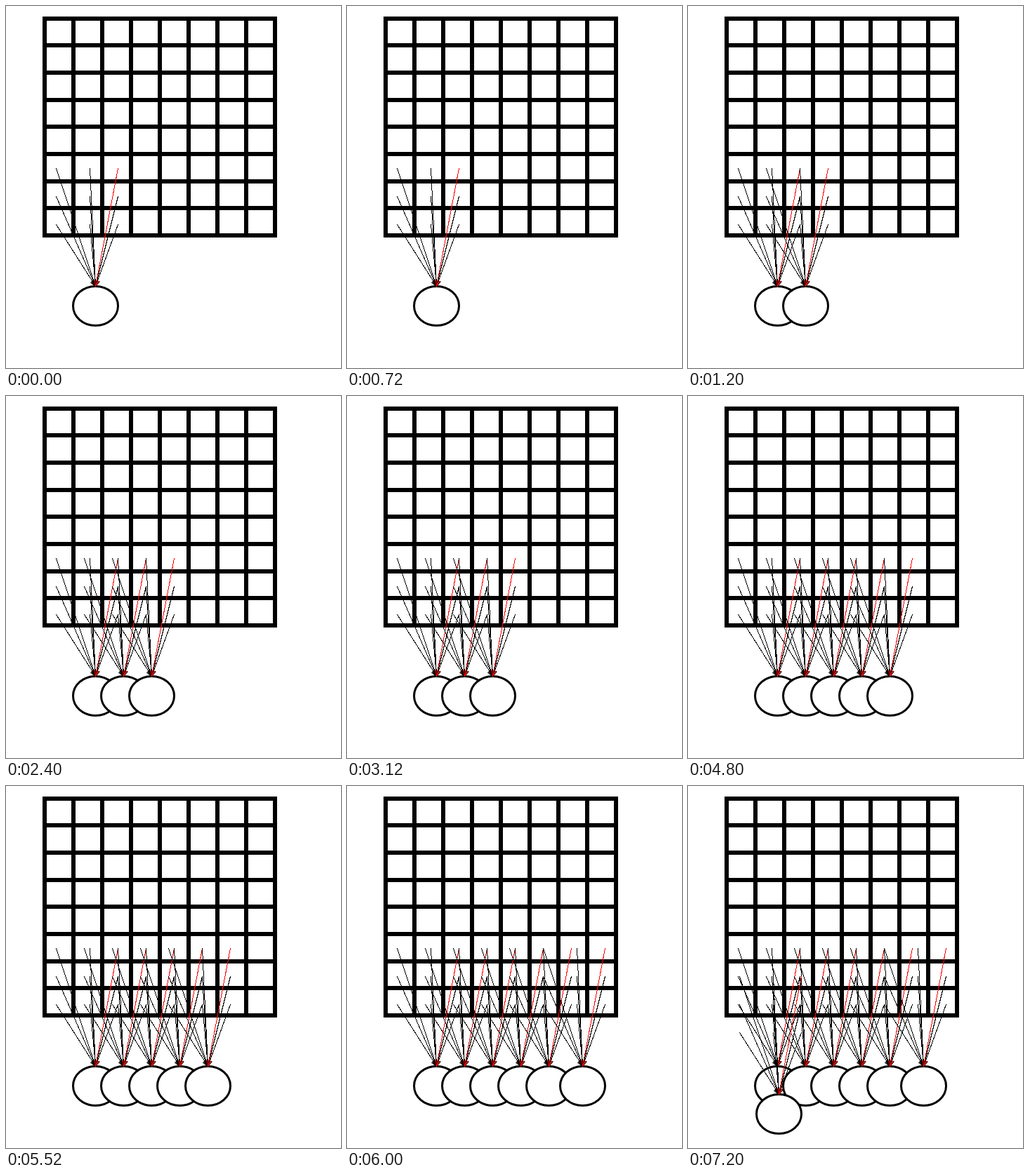
Recreate the animation shown at these times as an HTML page. Size 477 px wide and 516 px high, loop 8000 ms.

```html
<!DOCTYPE html>
<html lang="en">
<head>
<meta charset="utf-8">
<title>Sliding window connections</title>
<style>
  html, body { margin: 0; width: 100%; height: 100%; overflow: hidden; background: #fff; }
  svg { display: block; }
  .grid { stroke: #000; stroke-width: 6; fill: none; shape-rendering: crispEdges; }
  .link, .head { stroke: #000; stroke-width: 1; fill: none; }
  .link { shape-rendering: crispEdges; }
  .red { stroke: #f00; }
  .node { fill: #fff; stroke: #000; stroke-width: 3; }

  /* Each unit pops in 1.2 s after the one before it. */
  .unit { animation: 8s step-end infinite; }
  .u2 { animation-name: show2; }
  .u3 { animation-name: show3; }
  .u4 { animation-name: show4; }
  .u5 { animation-name: show5; }
  .u6 { animation-name: show6; }
  .u7 { animation-name: show7; }
  @keyframes show2 { 0% { visibility: hidden } 15%, 100% { visibility: visible } }
  @keyframes show3 { 0% { visibility: hidden } 30%, 100% { visibility: visible } }
  @keyframes show4 { 0% { visibility: hidden } 45%, 100% { visibility: visible } }
  @keyframes show5 { 0% { visibility: hidden } 60%, 100% { visibility: visible } }
  @keyframes show6 { 0% { visibility: hidden } 75%, 100% { visibility: visible } }
  @keyframes show7 { 0% { visibility: hidden } 90%, 100% { visibility: visible } }
</style>
</head>
<body>
<svg width="477" height="516" viewBox="0 0 477 516">
  <defs>
    <marker id="tip" viewBox="-10 -5 11 10" refX="0" refY="0" markerWidth="11" markerHeight="10"
            markerUnits="userSpaceOnUse" orient="auto">
      <path class="head" d="M-8.5-3.2L0 0L-8.5 3.2"/>
    </marker>
    <marker id="redTip" viewBox="-10 -5 11 10" refX="0" refY="0" markerWidth="11" markerHeight="10"
            markerUnits="userSpaceOnUse" orient="auto">
      <path class="head red" d="M-8.5-3.2L0 0L-8.5 3.2"/>
    </marker>
    <!-- Origin is the top of the node, where all nine links meet. -->
    <g id="unit">
      <ellipse class="node" cy="28" rx="32" ry="28"/>
      <g class="link" marker-end="url(#tip)">
        <path marker-end="url(#tip)" d="M-56-168L0 0"/>
        <path marker-end="url(#tip)" d="M-56-128L0 0"/>
        <path marker-end="url(#tip)" d="M-56-88L0 0"/>
        <path marker-end="url(#tip)" d="M-8-168L0 0"/>
        <path marker-end="url(#tip)" d="M-8-128L0 0"/>
        <path marker-end="url(#tip)" d="M-8-88L0 0"/>
        <path marker-end="url(#tip)" d="M32-128L0 0"/>
        <path marker-end="url(#tip)" d="M32-88L0 0"/>
      </g>
      <path class="link red" marker-end="url(#redTip)" d="M32-168L0 0"/>
    </g>
  </defs>

  <path class="grid" d="M55 15V330M96 15V330M137 15V330M178 15V330M219 15V330M260 15V330M301 15V330M342 15V330M383 15V330"/>
  <path class="grid" d="M52 17.5H386M52 56.2H386M52 94.9H386M52 133.6H386M52 172.3H386M52 211H386M52 249.7H386M52 288.4H386M52 327.1H386"/>

  <use href="#unit" x="127.5" y="399.5"/>
  <use href="#unit" class="unit u2" x="167.5" y="399.5"/>
  <use href="#unit" class="unit u3" x="207.5" y="399.5"/>
  <use href="#unit" class="unit u4" x="247.5" y="399.5"/>
  <use href="#unit" class="unit u5" x="287.5" y="399.5"/>
  <use href="#unit" class="unit u6" x="335.5" y="399.5"/>
  <use href="#unit" class="unit u7" x="129.5" y="439.5"/>
</svg>
</body>
</html>
```
